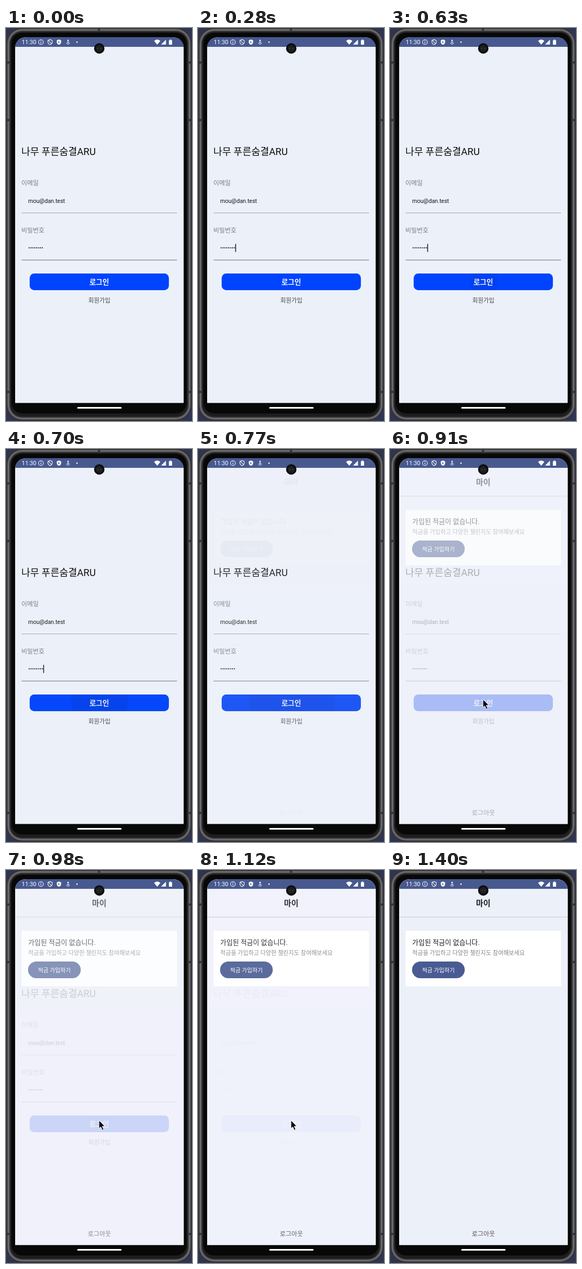
An HTML page that plays this animation: 346x730 px, repeating every 2.24 s.

```html
<!DOCTYPE html>
<html lang="ko">
<head>
<meta charset="utf-8">
<title>Login to my page</title>
<style>
html, body { margin: 0; width: 100%; height: 100%; overflow: hidden; background: #2f3450; }
svg { display: block; width: 346px; height: 730px; }
text { font-family: Roboto, "Noto Sans CJK KR", "Noto Sans CJK JP", sans-serif; }
.mid { text-anchor: middle; }
</style>
</head>
<body>
<svg viewBox="0 0 346 730">
  <defs>
    <clipPath id="screen"><path d="M17 696.500V37a20 20 0 0 1 20-20H310.500a20 20 0 0 1 20 20V696.500Z"/></clipPath>
    <clipPath id="button"><rect x="44" y="456" width="259" height="31" rx="8.500"/></clipPath>
  </defs>

  <!-- phone body -->
  <rect width="346" height="730" fill="#2f3450"/>
  <g id="rim"></g>
  <path d="M2 64h4M2 171h4M2 676h4M340 64h4M340 171h4M340 676h4M173 1v4" stroke="#333" stroke-width="4"/>
  <rect x="132.500" y="704" width="82.500" height="3" rx="1.500" fill="#fff"/>

  <g clip-path="url(#screen)">
    <rect x="17" y="17" width="314" height="680" fill="#ecf0f8"/>

    <!-- login page -->
    <g>
      <text x="28.500" y="235.500" font-size="18" fill="#0c0c0e">나무 푸른숨결ARU</text>
      <g font-size="11.700" fill="#7b7d82">
        <text x="28.500" y="292">이메일</text>
        <text x="28.500" y="380">비밀번호</text>
      </g>
      <text x="41.300" y="325" font-size="10.500" fill="#151517">mou@dan.test</text>
      <path d="M29 343.500H318" stroke="#a2a4a8"/>
      <path d="M29 431H318" stroke="#96989d" stroke-width="1.500"/>
      <g id="dots" fill="#111"></g>
      <rect id="caret" x="69.300" y="401" width="1.400" height="15" fill="#111"/>
      <g clip-path="url(#button)">
        <rect x="44" y="456" width="259" height="31" fill="#0044ff"/>
        <text class="mid" x="173.500" y="476.500" font-size="13.300" font-weight="700" fill="#fff">로그인</text>
        <rect id="press" x="44" y="456" width="259" height="31" opacity="0"/>
        <circle id="ripple" cx="174" cy="470" r="0" opacity=".05"/>
      </g>
      <text class="mid" x="173.700" y="510" font-size="11.100" fill="#47494d">회원가입</text>
    </g>

    <!-- my page -->
    <g id="sheet">
      <rect id="paper" x="17" y="17" width="314" height="680"/>
      <rect x="29" y="113" width="289" height="103" fill="#fff"/>
    </g>
    <g id="content">
      <path id="rule" d="M17 87.500H331"/>
      <text class="mid" x="173.500" y="67" font-size="14.600" font-weight="700" fill="#1c1c1e">마이</text>
      <text x="41.300" y="138.500" font-size="12.600" fill="#1c1c1e">가입된 적금이 없습니다.</text>
      <text x="41.300" y="157.800" font-size="10.800" fill="#84868a">적금을 가입하고 다양한 챌린지도 참여해보세요</text>
      <rect x="41" y="170" width="98" height="31" rx="15.500" fill="#495b92"/>
      <text class="mid" x="90" y="189.700" font-size="10.600" font-weight="500" fill="#fff">적금 가입하기</text>
      <text class="mid" x="173.700" y="680" font-size="11.700" fill="#505257">로그아웃</text>
    </g>

    <!-- status bar -->
    <rect x="17" y="17" width="314" height="18" fill="#48598f"/>
    <text x="29.300" y="30.200" font-size="10.900" fill="#fff">11:30</text>
    <g fill="none" stroke="#fff" stroke-width="1.100">
      <circle cx="65" cy="26.200" r="4.500"/>
      <path d="M65 25.500v3.200M65 23.300v1.200"/>
      <path d="M78 23l4-1.600 4 1.600v3q0 3.500-4 5-4-1.500-4-5ZM78.500 22.500l6.500 7"/>
      <path d="M115.500 22v6M113.500 26l2 2 2-2M112.800 27.500q0 2.700 2.700 2.700t2.700-2.700" stroke-width=".9"/>
      <circle cx="115.500" cy="23.300" r="1.100" stroke-width=".9"/>
    </g>
    <g fill="#fff">
      <path d="M94.500 23l4-1.700 4 1.700v3q0 3.700-4 5.300-4-1.600-4-5.300Z"/>
      <circle cx="132" cy="26.200" r="1.300"/>
      <path d="M275.500 24q5.800-4.800 11.600 0l-5.800 7ZM288.500 30.800l9-9v9Z"/>
      <path d="M303 22.800h1.700v-1.200h2.600v1.200h1.700v8.200h-6Z"/>
    </g>
    <path d="M97.300 24.200l3 2-3 2Z" fill="#48598f"/>
  </g>

  <!-- camera -->
  <circle cx="173.500" cy="38" r="9.700" fill="#0d0d0e"/>
  <circle cx="173.500" cy="38" r="5.500" fill="#1c1d1f" stroke="#2b2c2f"/>
  <path d="M170.500 38h1.500M175 38h1.500" stroke="#55585c" stroke-width="1.500"/>

  <path id="pointer" d="M173 465v15.300l3.400-3.200 2.700 6.100 2.600-1.100-2.700-6h4.700Z" fill="#000" stroke="#fff" stroke-width=".9"/>
</svg>
<script>
const LOOP = 2240, STEP = 70, PRESS = 560;
const $ = id => document.getElementById(id);

// [time, value] pairs
const sheetFade = [[630, 0], [700, .02], [770, .12], [840, .42], [910, .7], [980, .84], [1050, .92], [1120, .97], [1260, 1]];
const contentFade = [[700, 0], [770, .045], [840, .2], [910, .45], [980, .65], [1050, .8], [1120, .9], [1260, .97], [1400, 1]];
const tintFade = [[1120, 0], [1400, 1]];
const pressFade = [[630, 0], [770, .04]];

function sample(keys, t) {
  if (t <= keys[0][0]) return keys[0][1];
  for (let i = 1; i < keys.length; i++) {
    const [t0, v0] = keys[i - 1], [t1, v1] = keys[i];
    if (t <= t1) return v0 + (v1 - v0) * (t - t0) / (t1 - t0);
  }
  return keys[keys.length - 1][1];
}

const mix = (a, b, k) => `rgb(${a.map((v, i) => Math.round(v + (b[i] - v) * k))})`;
const show = (id, on) => $(id).setAttribute('visibility', on ? 'visible' : 'hidden');

// Soft metal rim: nested rounded rectangles, brightest a few pixels in
let rim = '';
for (let i = 1; i <= 10; i++) {
  const grey = i < 10 ? Math.round(28 + 85 * Math.exp(-(((i - 4) / 2.4) ** 2))) : 8;
  const foot = i < 10 ? i : 14;
  rim += `<rect x="${i}" y="${i - 1}" width="${346 - 2 * i}" height="${731 - i - foot}" rx="${30 - i}" fill="rgb(${grey},${grey},${grey})"/>`;
}
$('rim').innerHTML = rim;

let dots = '';
for (let i = 0; i < 8; i++) dots += `<circle cx="${43.2 + i * 3.5}" cy="408.3" r="1.1"/>`;
$('dots').innerHTML = dots;

function draw(now) {
  const t = Math.floor(now % LOOP / STEP) * STEP;
  const tint = sample(tintFade, t);
  $('sheet').setAttribute('opacity', sample(sheetFade, t));
  $('content').setAttribute('opacity', sample(contentFade, t));
  $('paper').setAttribute('fill', mix([241, 242, 251], [236, 240, 248], tint));
  $('rule').setAttribute('stroke', mix([217, 217, 226], [202, 202, 204], tint));
  $('rule').setAttribute('stroke-width', 2 - tint);
  $('press').setAttribute('opacity', sample(pressFade, t));
  $('ripple').setAttribute('r', Math.max(0, t - PRESS) * .38);
  show('caret', t >= 280 && t < 770);
  show('pointer', t >= 840 && t < 1260);
}

function tick() {
  draw(performance.now());
  requestAnimationFrame(tick);
}
tick();
</script>
</body>
</html>
```
